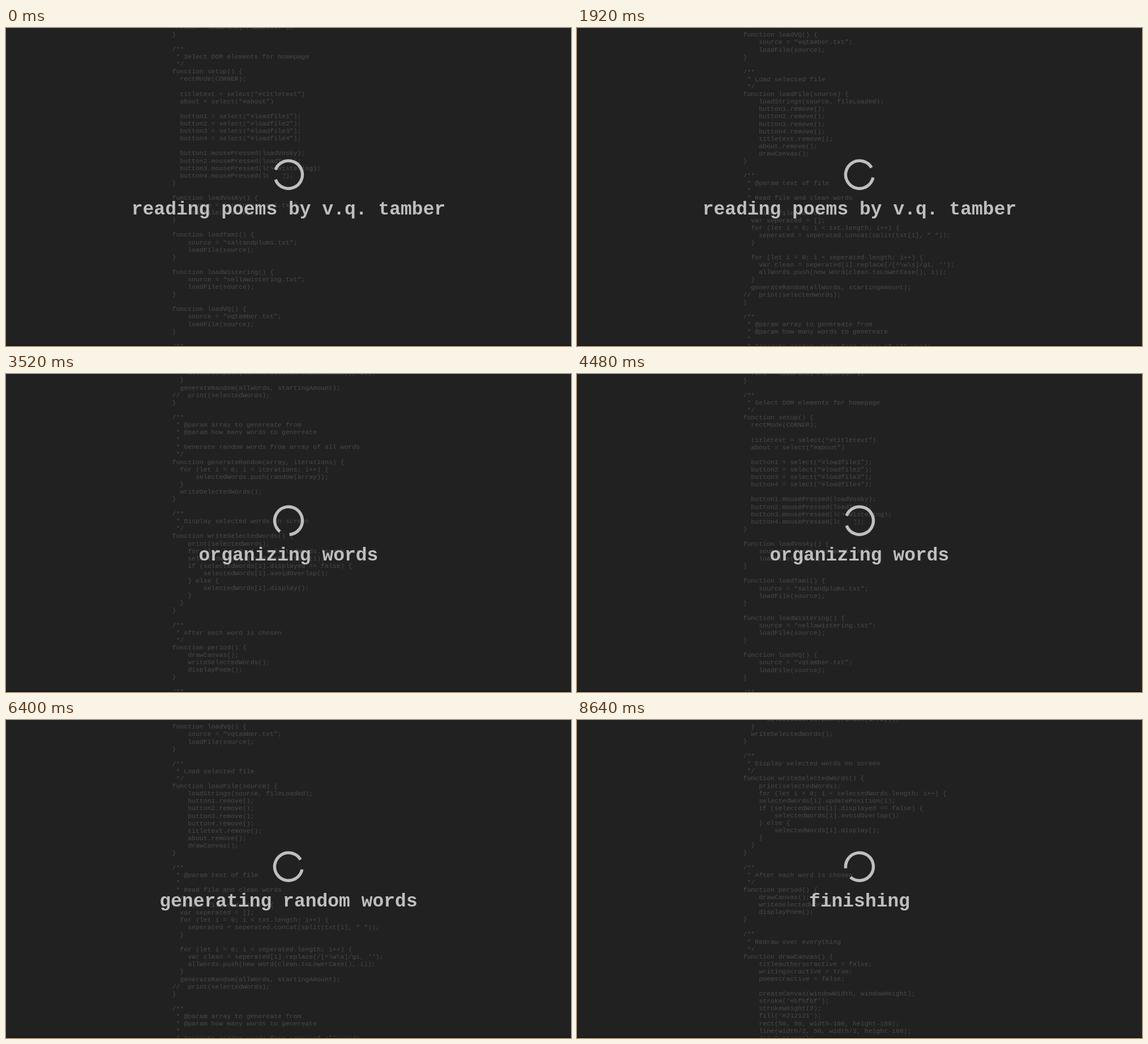
An HTML page for the animation above (8960 ms loop, 998 px wide and 561 px high).

```html
<!DOCTYPE html>
<html lang="en">
<head>
<meta charset="utf-8">
<title>Loading</title>
<style>
html, body { margin: 0; width: 100%; height: 100%; overflow: hidden; background: #212121; }
#stage { position: relative; width: 998px; height: 561px; overflow: hidden; background: #212121; }
#code {
  position: absolute; left: 293.5px; top: -8.2px; margin: 0;
  font: 11.53px/13.09375px "Liberation Mono", monospace;
  font-variant-ligatures: none; color: #4a4a4a; white-space: pre;
}
svg { position: absolute; left: 0; top: 0; }
#title { font: bold 33px "Liberation Mono", monospace; fill: #bfbfbf; text-anchor: middle; }
#ring { fill: none; stroke: #bfbfbf; stroke-width: 5.4; stroke-dasharray: 318 42; }
</style>
</head>
<body>
<div id="stage">
<pre id="code">
  font = loadFont(“Plain.ttf”);
}

/**
 * Select DOM elements for homepage
 */
function setup() {
  rectMode(CORNER);

  titletext = select(“#titletext”)
  about = select(“#about”)

  button1 = select(“#loadfile1”);
  button2 = select(“#loadfile2”);
  button3 = select(“#loadfile3”);
  button4 = select(“#loadfile4”);

  button1.mousePressed(loadVosky);
  button2.mousePressed(loadTami);
  button3.mousePressed(loadWistering);
  button4.mousePressed(loadVQ);
}

function loadVosky() {
    source = “orrinvoskamel.txt”;
    loadFile(source);
}

function loadTami() {
    source = “saltandplums.txt”;
    loadFile(source);
}

function loadWistering() {
    source = “nellawistering.txt”;
    loadFile(source);
}

function loadVQ() {
    source = “vqtamber.txt”;
    loadFile(source);
}

/**
 * Load selected file
 */
function loadFile(source) {
    loadStrings(source, fileLoaded);
    button1.remove();
    button2.remove();
    button3.remove();
    button4.remove();
    titletext.remove();
    about.remove();
    drawCanvas();
}

/**
 * @param text of file
 *
 * Read file and clean words
 */
function fileLoaded(txt) {
  var seperated = [];
  for (let i = 0; i &lt; txt.length; i++) {
    seperated = seperated.concat(split(txt[i], “ “));
  }

  for (let i = 0; i &lt; seperated.length; i++) {
    var clean = seperated[i].replace(/[^\w\s]/gi, ‘’);
    allWords.push(new Word(clean.toLowerCase(), i));
  }
  generateRandom(allWords, startingAmount);
//  print(selectedWords);
}

/**
 * @param array to genereate from
 * @param how many words to genereate
 *
 * Generate random words from array of all words
 */
function generateRandom(array, iterations) {
  for (let i = 0; i &lt; iterations; i++) {
      selectedWords.push(random(array));
  }
  writeSelectedWords();
}

/**
 * Display selected words on screen
 */
function writeSelectedWords() {
    print(selectedWords);
    for (let i = 0; i &lt; selectedWords.length; i++) {
    selectedWords[i].updatePosition(i);
    if (selectedWords[i].displayed == false) {
        selectedWords[i].avoidOverlap();
    } else {
        selectedWords[i].display();
    }
  }
}

/**
 * After each word is chosen
 */
function period() {
    drawCanvas();
    writeSelectedWords();
    displayPoem();
}

/**
 * Redraw over everything
 */
function drawCanvas() {
    titleauthorscractive = false;
    writingscractive = true;
    poemscractive = false;

    createCanvas(windowWidth, windowHeight);
    stroke(‘#bfbfbf’);
    strokeWeight(2);
    fill(‘#212121’);
    rect(50, 50, width-100, height-150);
    line(width/2, 50, width/2, height-100);
    drawButtons();
</pre>
<svg width="998" height="561" viewBox="0 0 998 561">
  <path id="wedge" fill="#212121" d="M496 262L464 246V271Z"/>
  <circle id="ring" cx="499" cy="258.7" r="24.5" pathLength="360"/>
  <text id="title" x="499" y="329"></text>
  <path fill="#0c0c0c" d="M0 560H998V561H0Z"/>
</svg>
</div>
<script>
const STEP = 320, STEPS = 28, CYCLE = 14, LINE = 13.09375;
const titles = [
  [0, 'reading poems by v.q. tamber'],
  [8, 'organizing words'],
  [15, 'generating random words'],
  [22, 'finishing']
];
// [step, direction of the ring's gap in degrees]
const turns = [[0, 180], [3, 270], [4, 298], [8, 404], [9, 422], [13, 512]];

const [code, ring, wedge, title] =
  ['code', 'ring', 'wedge', 'title'].map(id => document.getElementById(id));

function gapAngle(p) {
  const i = turns.findIndex(k => k[0] >= p);
  if (i < 1) return turns[0][1];
  const [a, from] = turns[i - 1], [b, to] = turns[i];
  return from + (to - from) * (p - a) / (b - a);
}

// the listing scrolls by whole lines after a short hold
const linesAt = p => Math.max(0, Math.round(6.7 * (p - 0.5)));

let shown = -1;
function draw(step) {
  const p = step % CYCLE;
  code.style.transform = `translateY(${-linesAt(p) * LINE}px)`;
  ring.setAttribute('transform', `rotate(${gapAngle(p) + 21} 499 258.7)`);
  wedge.style.display = p ? 'none' : '';
  title.textContent = titles.filter(t => t[0] <= step).pop()[1];
}

const start = performance.now();
function tick() {
  const step = Math.floor((performance.now() - start) / STEP) % STEPS;
  if (step !== shown) draw(shown = step);
  requestAnimationFrame(tick);
}
tick();
</script>
</body>
</html>
```
